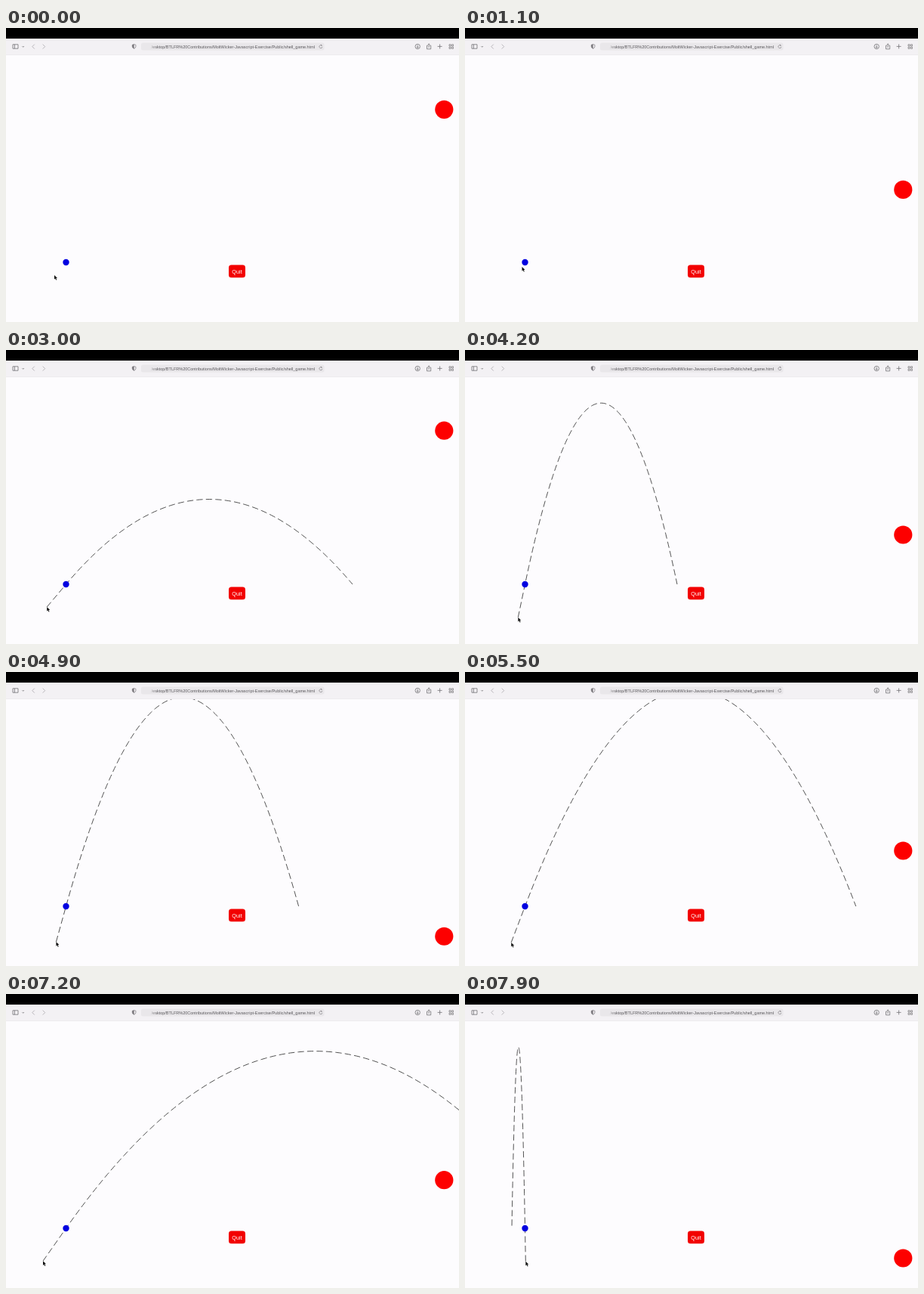
Write an HTML page with a canvas that moves like this. It is 600 px wide and 389 px high and loops after 8000 ms.

```html
<!DOCTYPE html>
<html lang="en">
<head>
<meta charset="utf-8">
<title>Slingshot</title>
<style>
html, body { margin: 0; width: 100%; height: 100%; overflow: hidden; background: #fdfcfe; }
canvas { display: block; width: 600px; height: 389px; }
</style>
</head>
<body>
<canvas id="stage"></canvas>
<script>
const W = 600, H = 389, LOOP = 8000, STEP = 100;
const FONT = '"Liberation Sans", Arial, sans-serif';
const BALL = { x: 79.5, y: 310 };
const PRESS = 1500;   // the drag begins here
const POWER = 0.25;   // drag length to flight size

// pointer path: time, x, y
const POINTER = [
  [0, 64, 327], [500, 66, 325], [1100, 75.5, 316], [1500, 79, 310.5],
  [1800, 72, 318], [2300, 63, 329], [2700, 56.5, 337], [3000, 54.2, 340],
  [3300, 52.8, 343.5], [3600, 55.5, 347], [4200, 70.3, 353.8], [4500, 70, 356],
  [5000, 65.5, 357.3], [5500, 61.2, 357.9], [6300, 48.4, 353.4],
  [7200, 49, 353.3], [7900, 80.3, 353.8]
];

const canvas = document.getElementById('stage');
const ctx = canvas.getContext('2d');
const dpr = window.devicePixelRatio || 1;
canvas.width = W * dpr;
canvas.height = H * dpr;
ctx.scale(dpr, dpr);

function rect(x, y, w, h, color) {
  ctx.fillStyle = color;
  ctx.fillRect(x, y, w, h);
}

function round(x, y, w, h, r) {
  ctx.beginPath();
  ctx.roundRect(x, y, w, h, r);
}

function disc(x, y, r, color) {
  ctx.beginPath();
  ctx.arc(x, y, r, 0, 2 * Math.PI);
  ctx.fillStyle = color;
  ctx.fill();
}

function icon(d, color = '#737175', width = 0.8) {
  ctx.strokeStyle = color;
  ctx.lineWidth = width;
  ctx.stroke(new Path2D(d));
}

function pointerAt(t) {
  const i = Math.max(1, POINTER.findIndex(p => p[0] >= t));
  const [t0, x0, y0] = POINTER[i - 1], [t1, x1, y1] = POINTER[i];
  const k = (t - t0) / (t1 - t0);
  return { x: x0 + (x1 - x0) * k, y: y0 + (y1 - y0) * k };
}

function drawChrome() {
  rect(0, 0, W, 36, '#f3f1f4');
  rect(0, 0, W, 14, '#000');
  rect(0, 35.5, W, 0.5, '#e6e4e7');

  round(179, 19.5, 242.5, 10, 2.5);
  ctx.fillStyle = '#e9e7ea';
  ctx.fill();
  const fade = ctx.createLinearGradient(189, 0, 199, 0);
  fade.addColorStop(0, '#58565a00');
  fade.addColorStop(1, '#58565a');
  ctx.fillStyle = fade;
  ctx.font = '5.5px ' + FONT;
  ctx.textAlign = 'right';
  ctx.textBaseline = 'alphabetic';
  ctx.fillText('/esktop/BTLFR%20Contributions/MoltWicker-Javascript-Exercise/Public/shell_game.html', 409, 26.5);

  icon('M9 21.8h7v5.4h-7zM11.4 21.8v5.4');
  icon('M21.4 24l1.3 1.3l1.3 -1.3');
  icon('M37.8 21.6l-3 3l3 3', '#aaa8ac');
  icon('M48.7 21.6l3 3l-3 3', '#aaa8ac');
  icon('M167.3 22.3l2.3 -.7l2.3 .7v2.5q-.3 1.7 -2.3 2.5q-2 -.8 -2.3 -2.5z', '#777579', 0.7);
  ctx.fillStyle = '#777579';
  ctx.fill(new Path2D('M169.6 21.6l-2.3 .7v2.5q.3 1.7 2.3 2.5z'));
  icon('M418.5 23.4a2 2 0 1 0 .4 1.5M417 22.1l1.3 .7l-.8 1.2', '#777579', 0.6);
  icon('M548.4 24.5a3.2 3.2 0 1 0 -6.4 0a3.2 3.2 0 1 0 6.4 0M545.2 22.6v3.6M543.8 24.9l1.4 1.4l1.4 -1.4');
  icon('M558.8 23.2h-1.3v4.6h5.2v-4.6h-1.3M560.1 26v-5M558.7 22.2l1.4 -1.4l1.4 1.4');
  icon('M574.6 21.4v6M571.6 24.4h6');
  icon('M587 21.8h2.1v2.1h-2.1zM590.4 21.8h2.1v2.1h-2.1zM587 25.2h2.1v2.1h-2.1zM590.4 25.2h2.1v2.1h-2.1z', '#737175', 0.7);
}

function drawFlight(p) {
  const dx = BALL.x - p.x, dy = p.y - BALL.y;
  const end = 2 * POWER * dy;
  ctx.beginPath();
  ctx.moveTo(p.x, p.y);
  for (let i = 0; i <= 120; i++) {
    const u = end * i / 120;
    ctx.lineTo(BALL.x + dx * u, BALL.y - dy * u + u * u / (2 * POWER));
  }
  ctx.setLineDash([8.3, 4.2]);
  ctx.strokeStyle = '#333';
  ctx.lineWidth = 0.85;
  ctx.stroke();
  ctx.setLineDash([]);
}

function drawButton() {
  round(295, 313.6, 22, 16.7, 3.6);
  ctx.fillStyle = '#f20000';
  ctx.fill();
  ctx.fillStyle = '#fff';
  ctx.font = '7.3px ' + FONT;
  ctx.textAlign = 'center';
  ctx.fillText('Quit', 306, 324.6);
}

function drawPointer({ x, y }) {
  ctx.save();
  ctx.translate(x, y);
  const arrow = new Path2D('M0 0v5.6l1.3 -1.2l1 2.2l1 -.4l-1 -2.2h1.7z');
  ctx.strokeStyle = '#fff';
  ctx.lineWidth = 0.9;
  ctx.stroke(arrow);
  ctx.fillStyle = '#111';
  ctx.fill(arrow);
  ctx.restore();
}

function draw(t) {
  const pointer = pointerAt(t);
  rect(0, 0, W, H, '#fdfcfe');
  if (t > PRESS) drawFlight(pointer);
  disc(BALL.x, BALL.y, 4.2, '#0000e0');
  disc(580.3, 212 - 139 * Math.cos(2 * Math.PI * (t - 345) / 2994), 12.1, '#fd0000');
  drawButton();
  drawChrome();
  drawPointer(pointer);
}

function frame() {
  const t = performance.now() % LOOP;
  draw(Math.floor(t / STEP) * STEP);
  requestAnimationFrame(frame);
}
frame();
</script>
</body>
</html>
```
